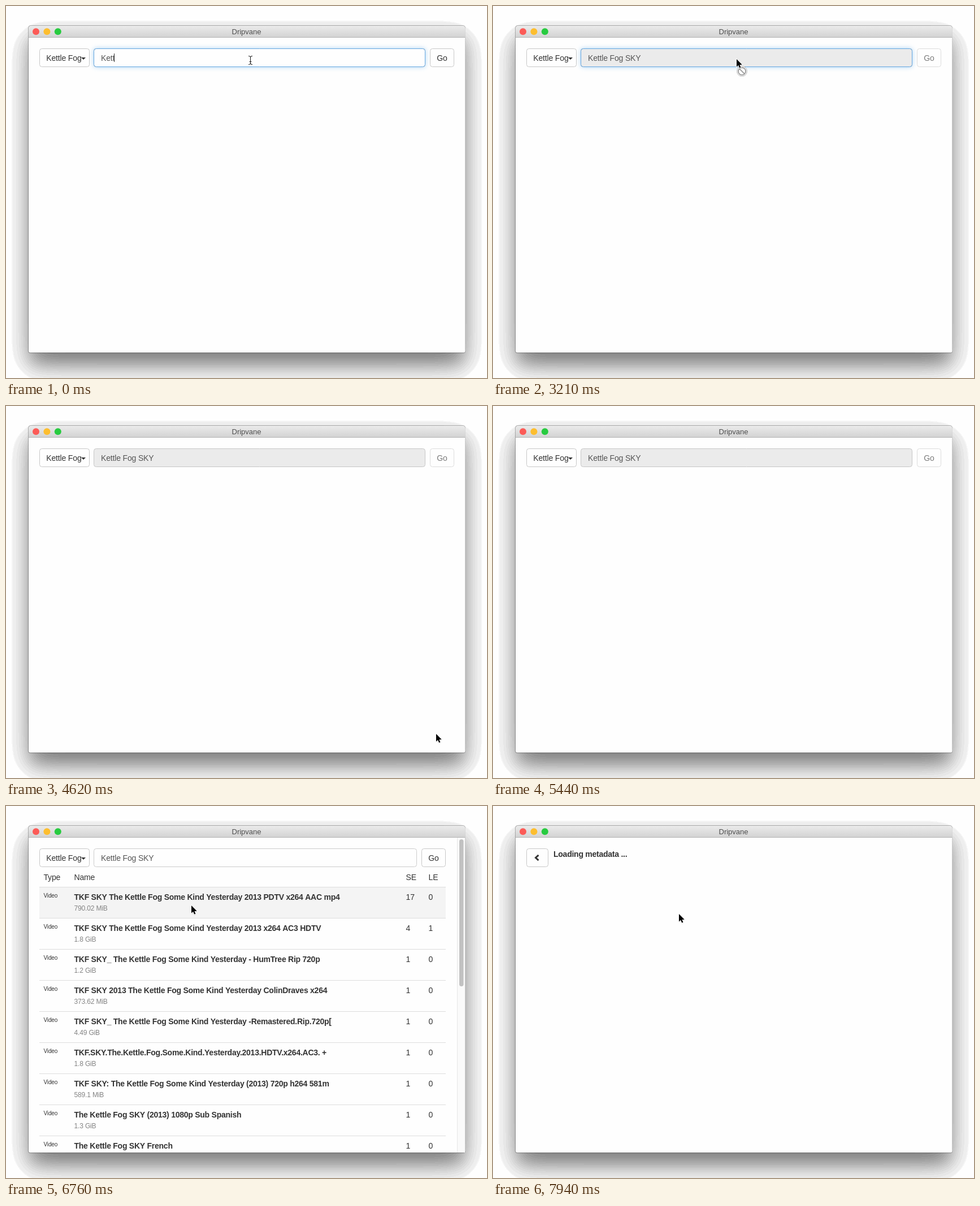
Write an HTML page with a canvas that moves like this. It is 851x658 px and loops after 8000 ms.

```html
<!DOCTYPE html>
<html lang="en">
<head>
<meta charset="utf-8">
<title>Dripvane</title>
<style>
  html, body { margin: 0; width: 100%; height: 100%; overflow: hidden; background: #fefefe; }
  canvas { display: block; }
</style>
</head>
<body>
<canvas id="stage" width="851" height="658"></canvas>
<script>
const W = 851, H = 658, LOOP = 8000;
const ctx = document.getElementById('stage').getContext('2d');
const FAMILY = '"Liberation Sans", Arial, sans-serif';
const PAGE = '#fefefe', INK = '#333';
const SITE = 'Kettle Fog';
const QUERY = SITE + ' SKY';
const TITLE = 'The ' + SITE + ' Some Kind Yesterday';

// name, size, seeders, leechers
const ROWS = [
  [`TKF SKY ${TITLE} 2013 PDTV x264 AAC mp4`, '790.02 MiB', 17, 0],
  [`TKF SKY ${TITLE} 2013 x264 AC3 HDTV`, '1.8 GiB', 4, 1],
  [`TKF SKY_ ${TITLE} - HumTree Rip 720p`, '1.2 GiB', 1, 0],
  [`TKF SKY 2013 ${TITLE} ColinDraves x264`, '373.62 MiB', 1, 0],
  [`TKF SKY_ ${TITLE} -Remastered.Rip.720p[`, '4.49 GiB', 1, 0],
  [`TKF.SKY.${TITLE.replaceAll(' ', '.')}.2013.HDTV.x264.AC3. +`, '1.8 GiB', 1, 0],
  [`TKF SKY: ${TITLE} (2013) 720p h264 581m`, '589.1 MiB', 1, 0],
  [`The ${QUERY} (2013) 1080p Sub Spanish`, '1.3 GiB', 1, 0],
  [`The ${QUERY} French`, '', 1, 0]
];

// time, number of typed characters, caret shown
const TYPING = [
  [0, 4, 1], [240, 4, 0], [360, 5, 1], [600, 6, 1], [950, 7, 1], [1430, 7, 0],
  [1910, 8, 1], [2150, 9, 1], [2270, 10, 1], [2390, 11, 1], [2500, 12, 1],
  [2740, 13, 1], [2850, 14, 1], [3210, 14, 0]
];

// time, tip x, tip y, shape
const POINTER = [
  [0, 432, 96, 'beam'], [3210, 431, 94, 'denied'], [3330, 430, 93, 'denied'],
  [3440, 429, 93, 'denied'], [3920, 428, 92, 'denied'], [4040, 423, 88, 'denied'],
  [4150, 540, 250, 'arrow'], [4270, 690, 470, 'arrow'], [4390, 771, 592, 'arrow'],
  [4620, 761, 580, 'arrow'], [4740, 774, 590, 'arrow'], [4860, 790, 604, 'arrow'],
  [4970, 796, 617, 'arrow'], [5090, 793, 629, 'arrow'], [5210, 787, 641, 'arrow'],
  [5330, 783, 652, 'arrow'], [5440, 0, 0, 'none'],
  [6400, 702, 366, 'arrow'], [6520, 350, 226, 'arrow'], [6640, 93, 157, 'arrow'],
  [6760, 328, 176, 'arrow'], [7470, 328, 179, 'arrow'], [7940, 329, 191, 'arrow']
];

const at = (keys, t) => keys.findLast(k => k[0] <= t);

function text(str, x, y, { size = 14, color = INK, bold = false, align = 'left' } = {}) {
  ctx.font = `${bold ? 'bold ' : ''}${size}px ${FAMILY}`;
  ctx.letterSpacing = (bold ? -0.25 : size === 13 ? 0 : -0.16) + 'px';
  ctx.textAlign = align;
  ctx.fillStyle = color;
  ctx.fillText(str, x, y);
  return ctx.measureText(str).width;
}

function rect(x, y, w, h, color) {
  ctx.fillStyle = color;
  ctx.fillRect(x, y, w, h);
}

function roundRect(x, y, w, h, r, fill, stroke) {
  ctx.beginPath();
  ctx.roundRect(x, y, w, h, r);
  if (fill) { ctx.fillStyle = fill; ctx.fill(); }
  if (stroke) { ctx.strokeStyle = stroke; ctx.lineWidth = 1; ctx.stroke(); }
}

function polygon(points, fill) {
  ctx.beginPath();
  points.forEach(([x, y]) => ctx.lineTo(x, y));
  ctx.closePath();
  ctx.fillStyle = fill;
  ctx.fill();
}

// Soft window shadow, reduced to visible bands.
function makeShadow() {
  const layer = document.createElement('canvas');
  layer.width = W;
  layer.height = H;
  const layerCtx = layer.getContext('2d');
  const image = layerCtx.createImageData(W, H);
  const sigma = 21, strength = 0.54, band = 7;
  const cdf = z => 1 / (1 + Math.exp(-1.702 * z));
  const span = (v, a, b) => cdf((v - a) / sigma) - cdf((v - b) / sigma);
  const across = Array.from({ length: W }, (_, x) => span(x + 0.5, 40, 812));
  const down = Array.from({ length: H }, (_, y) => span(y + 0.5, 56, 636));
  for (let i = 0; i < W * H; i++) {
    const gray = 254 * (1 - strength * across[i % W] * down[Math.floor(i / W)]);
    const shade = gray > 243 ? 254 : Math.round(gray / band) * band;
    image.data.fill(shade, i * 4, i * 4 + 3);
    image.data[i * 4 + 3] = 255;
  }
  layerCtx.putImageData(image, 0, 0);
  return layer;
}
const shadow = makeShadow();

function drawWindow() {
  ctx.drawImage(shadow, 0, 0);
  roundRect(39, 34, 774, 580, [5, 5, 4, 4], 'rgba(0,0,0,0.28)');
  roundRect(40, 35, 772.5, 578, [5, 5, 3, 3], PAGE);
  const bar = ctx.createLinearGradient(0, 35, 0, 55);
  bar.addColorStop(0, '#ebebeb');
  bar.addColorStop(1, '#d3d3d3');
  roundRect(40, 35, 772.5, 20, [5, 5, 0, 0], bar);
  rect(40, 55, 772.5, 1, '#b4b4b4');
  ['#fc5b57', '#fdbe2f', '#28cb40'].forEach((color, i) => {
    ctx.beginPath();
    ctx.arc(53 + i * 19.4, 45.3, 6, 0, Math.PI * 2);
    ctx.fillStyle = color;
    ctx.fill();
  });
  text('Dripvane', 425.5, 50, { size: 13, color: '#4d4d4d', align: 'center' });
}

function drawInput(right, disabled, focus) {
  const box = [155.5, 75.5, right - 156, 32, 4];
  if (focus) {
    ctx.save();
    ctx.shadowColor = `rgba(102,175,233,${0.6 * focus})`;
    ctx.shadowBlur = 8;
    roundRect(...box, '#fff');
    ctx.restore();
  }
  roundRect(...box, disabled ? '#ebebeb' : PAGE, disabled ? '#c6c6c6' : '#ccc');
  if (focus) {
    ctx.save();
    ctx.globalAlpha = focus;
    roundRect(...box, null, '#66a7e0');
    ctx.restore();
  }
}

function drawSearch(t) {
  const results = t >= 5800;
  const disabled = t >= 3210 && !results;
  const focus = t < 3330 ? 1 : t < 3440 ? 0.45 : 0;
  const right = results ? 727 : 742;

  roundRect(59.5, 75.5, 88, 32, 4, PAGE, '#c8c8c8');
  text(SITE, 71.3, 97);
  polygon([[133, 91], [141, 91], [137, 95]], INK);

  drawInput(right, disabled, focus);
  const [, count, caret] = at(TYPING, t);
  const width = text(QUERY.slice(0, count), 168, 97, { color: '#555' });
  if (caret) rect(Math.floor(167.6 + width), 84, 1, 15, '#333');

  roundRect(right + 8.5, 75.5, 42, 32, 4, PAGE, disabled ? '#dcdcdc' : '#c8c8c8');
  text('Go', right + 29.5, 97, { color: disabled ? '#7b7b7b' : INK, align: 'center' });
}

function drawResults(pointer) {
  ctx.save();
  ctx.beginPath();
  ctx.rect(40, 56, 772, 557);
  ctx.clip();
  [['Type', 66.5], ['Name', 120.5], ['SE', 707.5], ['LE', 747.5]]
    .forEach(([label, x]) => text(label, x, 131));
  const hovered = pointer[3] === 'arrow' ? Math.floor((pointer[2] - 143) / 55) : -1;
  ROWS.forEach(([name, size, seeders, leechers], i) => {
    const y = 143 + i * 55;
    if (i === hovered) rect(59, y, 719, 55, '#f4f4f4');
    rect(59, y, 719, 1, '#ddd');
    text('Video', 66.5, y + 19, { size: 10 });
    text(name, 120.5, y + 23, { bold: true });
    text(size, 120.5, y + 42, { size: 12, color: '#848484' });
    text(String(seeders), 707.5, y + 23);
    text(String(leechers), 747.5, y + 23);
  });
  rect(798, 56, 14, 557, '#fafafa');
  rect(798, 56, 1, 557, '#e6e6e6');
  roundRect(802, 59, 7.5, 260, 4, '#c1c1c1');
  ctx.restore();
}

function drawLoading() {
  roundRect(59.5, 75.5, 38, 32, 4, PAGE, '#c8c8c8');
  ctx.beginPath();
  ctx.moveTo(80.5, 86.8);
  ctx.lineTo(75.5, 91.5);
  ctx.lineTo(80.5, 96.2);
  ctx.strokeStyle = INK;
  ctx.lineWidth = 3;
  ctx.stroke();
  text('Loading metadata ...', 107, 90, { bold: true });
}

function drawBeam() {
  ctx.beginPath();
  for (const s of [-1, 1]) {
    ctx.moveTo(-3, 7.5 * s);
    ctx.quadraticCurveTo(0.5, 7.5 * s, 0.5, 5 * s);
    ctx.quadraticCurveTo(0.5, 7.5 * s, 4, 7.5 * s);
  }
  ctx.moveTo(0.5, -6);
  ctx.lineTo(0.5, 6);
  ctx.moveTo(-1.5, 2.5);
  ctx.lineTo(2.5, 2.5);
  ctx.strokeStyle = '#222';
  ctx.lineWidth = 1.1;
  ctx.stroke();
}

function drawArrow() {
  ctx.save();
  ctx.shadowColor = 'rgba(0,0,0,0.35)';
  ctx.shadowBlur = 2;
  ctx.shadowOffsetY = 1;
  const shape = [[0, 0], [0, 13.6], [3.1, 10.8], [5.2, 15.6], [7.4, 14.7], [5.4, 9.9], [9.7, 9.7]];
  polygon(shape, '#000');
  ctx.restore();
  ctx.strokeStyle = '#fff';
  ctx.lineWidth = 1.6;
  ctx.stroke();
  polygon(shape, '#000');
}

function drawDeniedBadge() {
  ctx.beginPath();
  ctx.arc(9.5, 21.5, 9, 0, Math.PI * 2);
  ctx.fillStyle = '#fff';
  ctx.fill();
  ctx.strokeStyle = '#bdbdbd';
  ctx.lineWidth = 1;
  ctx.stroke();
  ctx.beginPath();
  ctx.arc(9.5, 21.5, 6.6, 0, Math.PI * 2);
  ctx.moveTo(4.9, 16.9);
  ctx.lineTo(14.1, 26.1);
  ctx.strokeStyle = '#a0a0a0';
  ctx.lineWidth = 2;
  ctx.stroke();
}

function drawPointer([, x, y, shape]) {
  if (shape === 'none') return;
  ctx.save();
  ctx.translate(x, y);
  if (shape === 'beam') drawBeam();
  else {
    if (shape === 'denied') drawDeniedBadge();
    drawArrow();
  }
  ctx.restore();
}

function draw(t) {
  const pointer = at(POINTER, t);
  drawWindow();
  if (t >= 7350) drawLoading();
  else {
    drawSearch(t);
    if (t >= 5800) drawResults(pointer);
  }
  drawPointer(pointer);
}

const start = performance.now();
function tick() {
  draw((performance.now() - start) % LOOP);
  requestAnimationFrame(tick);
}
tick();
</script>
</body>
</html>
```
